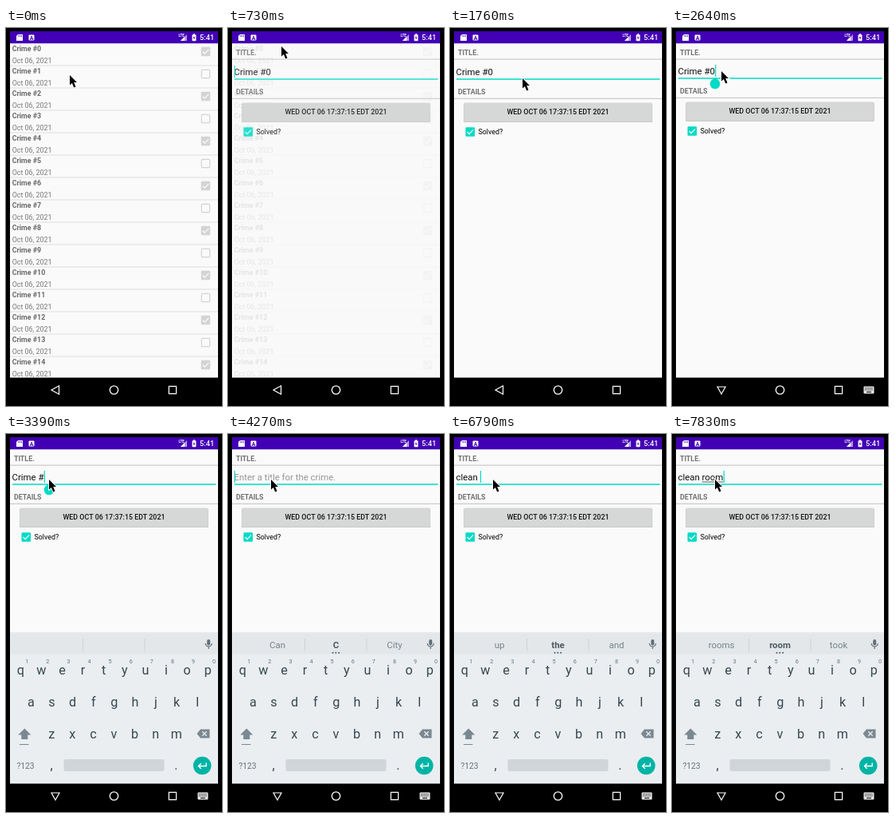
Write an HTML page with a canvas that moves like this. It is 271x473 px and loops after 8 s.

```html
<!DOCTYPE html>
<html lang="en">
<head>
<meta charset="utf-8">
<title>Crime list</title>
<style>
html, body { margin: 0; height: 100%; overflow: hidden; background: #000; }
canvas { display: block; width: 271px; height: 473px; }
</style>
</head>
<body>
<canvas></canvas>
<script>
const W = 271, H = 473, LOOP = 8000;
const TOP = 19.2, BOTTOM = 437.6;
const TEAL = '#03dac5', KEY = '#37474f', PAPER = '#fafafa';
const canvas = document.querySelector('canvas');
const c = canvas.getContext('2d');
const dpr = window.devicePixelRatio || 1;
canvas.width = W * dpr;
canvas.height = H * dpr;

// Each track holds its value until the next time.
const pointer = [
  [0, 80, 59], [140, 75, 47], [290, 70, 35], [440, 67, 28], [730, 67, 23],
  [880, 68, 13], [1020, 69, 5], [1170, 71, 3], [1320, 75, 13], [1470, 83, 33],
  [1620, 91, 63], [1770, 93, 90], [1910, 88, 81], [2060, 77, 67],
  [2200, 68, 58], [2340, 62, 54], [2790, 58, 56], [2940, 54, 57]
];
const typed = [
  [0, 'Crime #0'], [3390, 'Crime #'], [3540, 'Crime '], [3690, 'Crime'],
  [3840, 'Crim'], [3980, 'Cri'], [4130, 'C'], [4270, ''], [4870, 'c'],
  [5020, 'cl'], [5320, 'cle'], [5460, 'clea'], [5610, 'clean'], [5900, 'clean '],
  [7240, 'clean r'], [7390, 'clean ro'], [7540, 'clean roo'], [7690, 'clean room']
];
const hints = [
  [0, ''], [3690, 'Crimes Crime Crimea'], [3840, 'Crimes Crim Crime'],
  [3980, 'Crisis Cri Cried'], [4130, 'Can C City'], [4870, 'can c could'],
  [5170, 'close cl class'], [5320, 'clear cle clean'], [5460, 'clear clea clean'],
  [5760, 'cleaning clean cleaned'], [6050, 'up the and'], [7240, 'right r really'],
  [7390, 'room ro road'], [7540, 'room roo root'], [7830, 'rooms room took']
];
const caretOn = [[0, 1], [1470, 0], [1910, 1], [6350, 0], [6790, 1]];
const fade = [[0, 0], [580, 0.4], [730, 0.85], [880, 1]];
const keyboardY = [[0, 189], [2790, 90], [2940, 0]];

const at = (track, t) => track.findLast(step => step[0] <= t);

function rect(x, y, w, h, color, r = 0) {
  c.fillStyle = color;
  c.beginPath();
  c.roundRect(x, y, w, h, r);
  c.fill();
}

function disc(x, y, r, color) {
  c.fillStyle = color;
  c.beginPath();
  c.arc(x, y, r, 0, 7);
  c.fill();
}

function text(s, x, y, size, color, weight = 400, align = 'left') {
  c.font = `${weight} ${size}px Roboto, sans-serif`;
  c.textAlign = align;
  c.fillStyle = color;
  c.fillText(s, x, y);
}

function shape(x, y, d, fill, stroke, width = 1) {
  c.save();
  c.translate(x, y);
  const path = new Path2D(d);
  if (stroke) {
    c.strokeStyle = stroke;
    c.lineWidth = width;
    c.stroke(path);
  }
  if (fill) {
    c.fillStyle = fill;
    c.fill(path);
  }
  c.restore();
}

function checkbox(x, y, size, color, checked) {
  const h = size / 2;
  if (checked) {
    rect(x - h, y - h, size, size, color, 1.3);
    shape(x, y, 'M-3.7 0L-1.2 2.6L3.8-2.6', null, PAPER, 1.3);
  } else {
    c.strokeStyle = color;
    c.lineWidth = 1.2;
    c.beginPath();
    c.roundRect(x - h + 0.6, y - h + 0.6, size - 1.2, size - 1.2, 1);
    c.stroke();
  }
}

function statusBar() {
  rect(5, 4, 261, TOP - 4, '#4100b3');
  shape(17, 12, 'M-2-4H4V4H-4V-2Z', '#fff');
  shape(17, 12, 'M-1.3-3V-1M.6-3V-1M2.5-3V-1', null, '#4100b3', 0.8);
  rect(28.5, 8.5, 7, 7, '#fff', 1);
  text('A', 32, 14.6, 7, '#4100b3', 700, 'center');
  text('LTE', 216.5, 11, 4.5, '#fff', 700);
  shape(223, 12, 'M4-4V4H-4Z', '#b79be2');
  shape(223, 12, 'M1-1V4H-4Z', '#fff');
  rect(233.5, 8.3, 5, 8, '#fff', 0.8);
  rect(235, 7.3, 2, 1.2, '#fff');
  shape(236, 12.3, 'M.4-2.8L-1.4.5H0L-.4 2.8L1.4-.5H0Z', '#4100b3');
  text('5:41', 243, 15.2, 9.3, '#fff', 500);
}

function list() {
  rect(5, 19, 261, 419, PAPER);
  for (let i = 0; i < 15; i++) {
    const y = 19 + i * 28;
    text('Crime #' + i, 7.7, y + 10, 8.9, '#696969', 700);
    text('Oct 06, 2021', 7.7, y + 25, 8.9, '#757575');
    rect(5, y + 27.4, 261, 1, '#dfdfdf');
    checkbox(250.5, y + 10.5, 11.5, '#d4d4d4', i % 2 === 0);
  }
}

function header(s, y) {
  text(s, 9.9, y, 8.9, '#727272', 700);
  rect(5, y + 4.8, 261, 1.3, '#cbcbcb');
}

function details(t) {
  const focused = t >= 2640;
  const dy = focused ? 0 : 1;
  const s = at(typed, t)[1];
  rect(5, 19, 261, 419, PAPER);
  header('TITLE.', 33.7);
  header('DETAILS', 82 + dy);

  const base = 58 + dy;
  text(s || 'Enter a title for the crime.', 7.5, base, 11.4, s ? '#111' : '#969696');
  const width = c.measureText(s).width;
  const word = s.split(' ').pop();
  if (t >= 3690 && word) {
    const w = c.measureText(word).width;
    rect(7.5 + width - w, base + 1.6, w, 0.8, '#333');
  }
  rect(8, 62.2 + dy, 255.5, 1.6, TEAL);
  if (at(caretOn, t)[1]) rect(focused ? 7.8 + width : 7.8, 46 + dy, 1.2, 15, TEAL);

  rect(17, 92.9 + dy, 237, 24, '#cbcbcb', 1.5);
  rect(17.5, 92.4 + dy, 236, 23.3, '#d6d7d7', 1.5);
  text('WED OCT 06 17:37:15 EDT 2021', 135.5, 107.2 + dy, 8.9, '#111', 500, 'center');
  checkbox(25.3, 129 + dy, 11.6, TEAL, true);
  text('Solved?', 35.5, 132.2 + dy, 8.9, '#000');

  if (focused && t < 3540) {
    shape(54, 70, 'M0-8L4.6-4.4H-4.6Z', TEAL);
    disc(54, 70, 6.3, TEAL);
  }
}

function keyRow(keys, x, y) {
  [...keys].forEach((k, i) => text(k, x + i * 26.1, y, 16.2, KEY, 400, 'center'));
}

function keyboard(t) {
  c.save();
  c.beginPath();
  c.rect(5, 19, 261, 419);
  c.clip();
  c.translate(0, at(keyboardY, t)[1]);
  rect(5, 248.5, 261, 1, '#d5d9db');
  rect(5, 249.5, 261, 189, '#eaeef1');
  rect(5, 249.5, 261, 26, '#e3e7ea');
  rect(96, 256, 1, 16, '#cdd3d6');
  rect(173.5, 256, 1, 16, '#cdd3d6');

  const words = at(hints, t)[1];
  if (words) {
    words.split(' ').forEach((w, i) => {
      const mid = i === 1;
      text(w, 62 + i * 73.5, 268, 11.4, mid ? '#4a5a63' : '#75838b', mid ? 700 : 400, 'center');
    });
    for (const x of [131.5, 135.3, 139.1]) disc(x, 273.7, 1, '#4a5a63');
  }
  rect(252.2, 257, 4, 7.5, '#617079', 2);
  shape(254.2, 263, 'M-4-1A4 4 0 0 0 4-1M0 3V6', null, '#617079', 1.2);

  keyRow('qwertyuiop', 18.3, 301);
  [...'1234567890'].forEach((d, i) => text(d, 26.2 + i * 26.1, 287.3, 7.2, '#68777f', 400, 'center'));
  keyRow('asdfghjkl', 31.4, 341);
  keyRow('zxcvbnm', 57.2, 380.5);
  shape(23.3, 375.5, 'M0-7L8 1H4V6.5H-4V1H-8Z', '#7a8891');
  rect(17, 388, 11.5, 1, '#7a8891');
  shape(247.5, 375, 'M-8 0L-3.5-5.5H8V5.5H-3.5Z', '#7a8891');
  shape(249, 375, 'M-2.7-2.7L2.7 2.7M2.7-2.7L-2.7 2.7', null, '#eaeef1', 1.3);
  text('?123', 24.5, 418.5, 10.3, '#65747c', 400, 'center');
  text(',', 57, 420, 16.2, KEY, 400, 'center');
  rect(72.5, 407, 126, 15, '#cfd5d9', 2.5);
  text('.', 213.5, 420, 16.2, KEY, 400, 'center');
  disc(246.2, 415, 11.3, '#00b4a5');
  shape(246.2, 415, 'M5-3.5V.5H-4.5M-1.5-2.7L-4.7.5L-1.5 3.7', null, '#fff', 1.4);
  c.restore();
}

function navBar(t) {
  const open = t >= 2640;
  rect(0, BOTTOM, W, H - BOTTOM, '#000');
  shape(62, 453, open ? 'M-5-4H5L0 5Z' : 'M4.5-5.2V5.2L-5 0Z', null, '#fff', 1.2);
  shape(135.5, 453, 'M5.2 0A5.2 5.2 0 1 1-5.2 0A5.2 5.2 0 1 1 5.2 0', null, '#fff', 1.3);
  shape(209, 453, 'M-4.6-4.6H4.6V4.6H-4.6Z', null, '#fff', 1.2);
  if (!open) return;
  rect(240.5, 448.5, 13, 9, '#e8e8e8', 1);
  for (let i = 0; i < 10; i++) {
    rect(242 + (i % 5) * 2.1, 450 + Math.floor(i / 5) * 2.2, 1.2, 1.2, '#222');
  }
  rect(244, 454.9, 6, 1.2, '#222');
}

function draw(now) {
  const t = now % LOOP;
  c.setTransform(dpr, 0, 0, dpr, 0, 0);
  rect(0, 0, W, H, '#000');
  const alpha = at(fade, t)[1];
  if (alpha < 1) list();
  c.globalAlpha = alpha;
  if (alpha) details(t);
  c.globalAlpha = 1;
  if (t >= 2790) keyboard(t);
  statusBar();
  navBar(t);
  const [, x, y] = at(pointer, t);
  shape(x, y, 'M0 0V12.6L2.9 10L5.2 15.4L7.5 14.4L5.2 9.1H9Z', '#000', '#fff', 1.8);
  requestAnimationFrame(draw);
}
requestAnimationFrame(draw);
</script>
</body>
</html>
```
